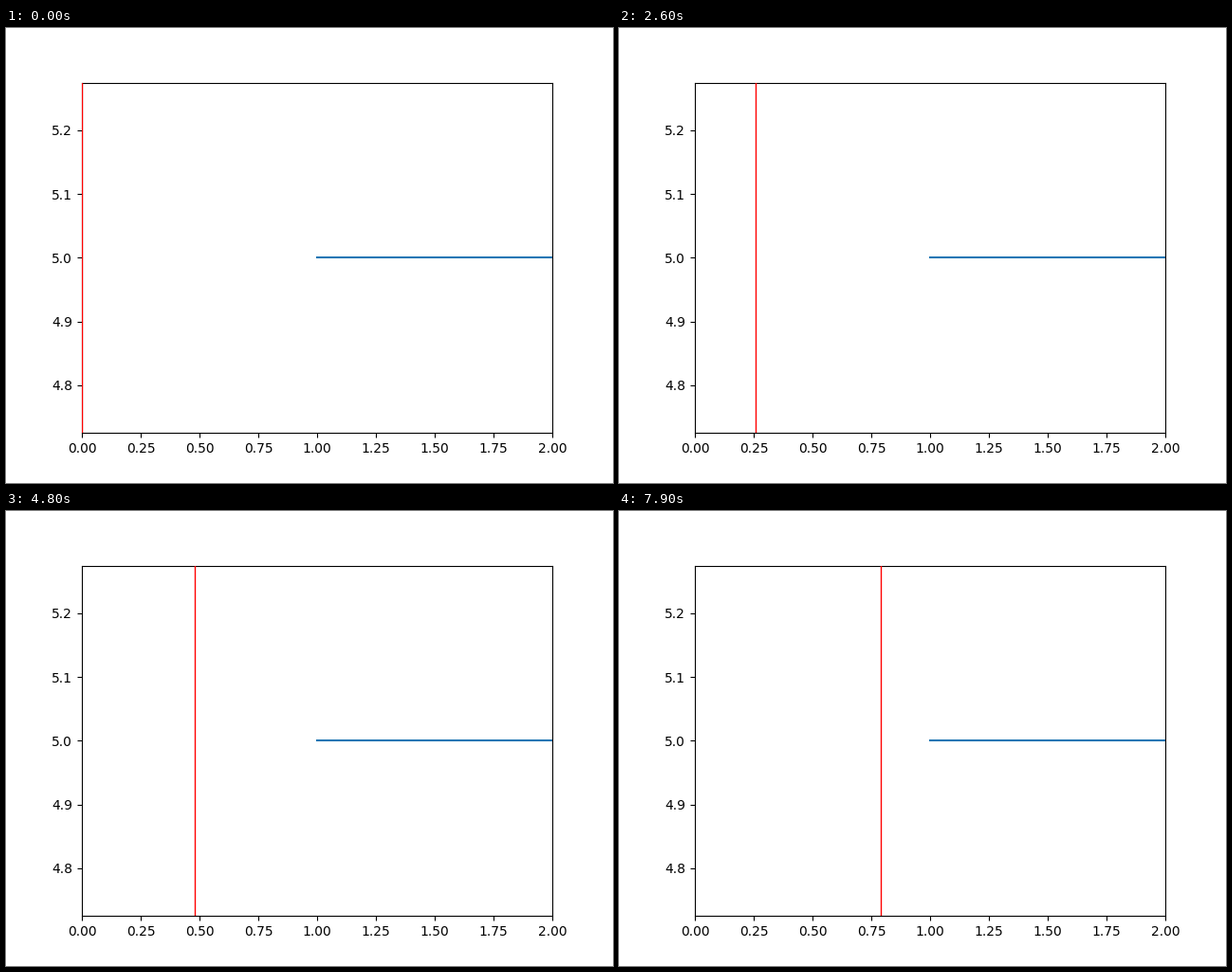
A matplotlib script that plays this animation: 640x480 px, repeating every 8 s.

```python
import matplotlib.pyplot as plt
from matplotlib.animation import FuncAnimation

FRAMES = 80
STEP = 0.01  # cursor travel per frame, in data units

fig, ax = plt.subplots(figsize=(6.4, 4.8), dpi=100)
ax.plot([1, 2], [5, 5])
ax.set_xlim(0, 2)
ax.set_ylim(4.725, 5.275)

# The cursor lies above the axes frame.
cursor = ax.axvline(0, color="red", linewidth=1, zorder=3)


def update(i):
    x = i * STEP
    cursor.set_xdata([x, x])
    return (cursor,)


anim = FuncAnimation(fig, update, frames=FRAMES, interval=100,
                     repeat=True, repeat_delay=0)
plt.show()
```
